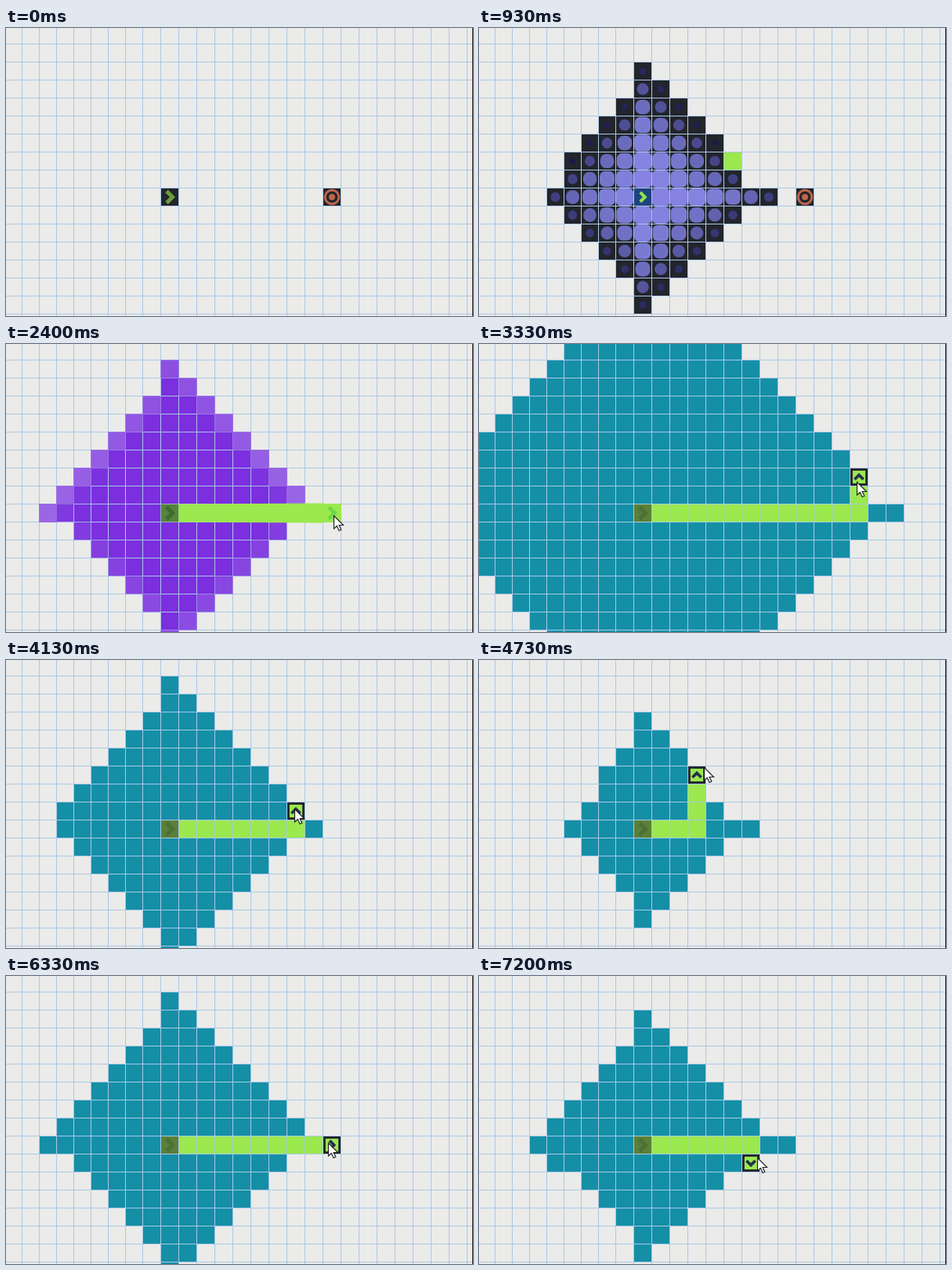
An HTML page with a canvas that plays this animation: 596 by 368 pixels, repeating every 7.27 s.

```html
<!DOCTYPE html>
<html lang="en">
<head>
<meta charset="utf-8">
<title>Pathfinding grid</title>
<style>
html, body { margin: 0; height: 100%; overflow: hidden; background: #ebebe9; }
canvas { display: block; }
</style>
</head>
<body>
<canvas id="stage" width="596" height="368"></canvas>
<script>
const ctx = document.getElementById('stage').getContext('2d');
const LOOP = 7270, DRAG = 2930, PATH = 1400;
const DARK = '#22252b', GREEN = '#9be84f', TEAL = '#158fa6';
const START = { c: 8, r: 8 }, GOAL = { c: 17, r: 8 };
const ARROW = new Path2D('M0 0V16.5L3.8 13L6.6 19L9.3 17.8L6.6 12H12Z');

// Pointer stops: time, column, row (fractions lie inside a cell).
const POINTER = [
  [1330, 21.8, 8.3], [1530, 21.6, 8.1], [1600, 20.9, 8.2], [1730, 19.8, 8.4],
  [1800, 19, 8.5], [1930, 18.1, 8.6], [2000, 17.6, 8.65],
  [2930, 18.2, 8.6], [3000, 19.1, 8.4], [3130, 20.1, 8.2], [3200, 20.4, 7.7],
  [3330, 20.4, 6.8], [3400, 20.3, 6.2], [3530, 20, 5.7], [3600, 19.3, 5.5],
  [3730, 18.6, 5.8], [3800, 18.1, 6.2], [3930, 17.2, 6.7], [4000, 16.4, 7.1],
  [4130, 15.43, 7.4], [4260, 15, 7.3], [4330, 14.5, 7.2],
  [4460, 13.6, 7], [4530, 12.9, 6.6], [4660, 12.5, 5.8], [4730, 11.9, 5.1],
  [4860, 11.3, 4.3], [4930, 10.7, 3.6], [5060, 10.2, 3.1], [5130, 9.9, 2.8],
  [5260, 10.6, 3.6], [5330, 11.65, 4.73], [5460, 12.1, 5.2], [5530, 12.6, 5.7],
  [5660, 13.1, 6.2], [5730, 13.6, 6.6], [5930, 14.2, 7.1], [6000, 14.5, 7.3],
  [6200, 16.1, 8.1], [6330, 17.3, 8.4], [6530, 16.8, 8.5], [6600, 15.8, 8.5],
  [6730, 16.3, 8.5], [6800, 17.2, 8.5], [7000, 16.4, 8.7], [7130, 15.6, 9.1],
  [7200, 14.87, 9.2]
];

const X = c => c >= 7 ? 174 + 23 * (c - 7) : 20 + 22 * c;
const Y = r => 20 + 23 * r;

// Piecewise linear lookup over [position, value] stops; values may be arrays.
function ramp(stops, p) {
  let i = 1;
  while (i < stops.length - 1 && p > stops[i][0]) i++;
  const [a, u] = stops[i - 1], [b, v] = stops[i];
  const k = Math.min(1, Math.max(0, (p - a) / (b - a)));
  return Array.isArray(u) ? u.map((n, j) => n + (v[j] - n) * k) : u + (v - u) * k;
}

// Search order: expanding waves, each swept from the top row down.
function order(c, r) {
  const dx = c - 8, dy = r - 8;
  const wave = Math.abs(dx) + Math.abs(dy) + (dx < 0) - (dy === 0 && dx > 0);
  return wave * 1000 + r * 30 + c;
}

const cells = [];
for (let r = -1; r < 16; r++)
  for (let c = -1; c < 26; c++) cells.push({ c, r, key: order(c, r) });
const CLOCK = [[0, 130], [44, 395], [84, 925], [116, 1226]];
[...cells].sort((a, b) => a.key - b.key).forEach((cell, i) => {
  cell.at = i <= 116 ? ramp(CLOCK, i) : Infinity;
});

const SCALE = [[0, .3], [750, 1], [1125, 1.1], [1500, 1]];
const TINT = [[0, [22, 22, 68]], [750, [132, 132, 224]], [1125, [160, 112, 230]], [1500, [123, 47, 222]]];
const ROUND = [[0, 1], [1000, 0]];
const PATH_SCALE = [[0, .6], [500, 1.14], [1200, 1]];

function box({ c, r }, color, scale = 1, round = 0) {
  const w = X(c + 1) - X(c) - 1, h = 22, sw = w * scale, sh = h * scale;
  ctx.fillStyle = color;
  ctx.beginPath();
  ctx.roundRect(X(c) + 1 + (w - sw) / 2, Y(r) + 1 + (h - sh) / 2, sw, sh, Math.min(.5, round) * sw);
  ctx.fill();
}

function atCenter({ c, r }, draw) {
  ctx.save();
  ctx.translate(X(c) + 12, Y(r) + 12);
  draw();
  ctx.restore();
}

function chevron(cell, color, scale = 1, turn = 0) {
  atCenter(cell, () => {
    ctx.rotate(turn * Math.PI / 2);
    ctx.scale(scale, scale);
    ctx.beginPath();
    ctx.moveTo(-4, -7.5);
    ctx.lineTo(3.5, 0);
    ctx.lineTo(-4, 7.5);
    ctx.lineWidth = 5;
    ctx.strokeStyle = color;
    ctx.stroke();
  });
}

function rings(cell, color, scale) {
  atCenter(cell, () => {
    ctx.scale(scale, scale);
    ctx.strokeStyle = ctx.fillStyle = color;
    ctx.lineWidth = 3;
    ctx.beginPath();
    ctx.arc(0, 0, 8.8, 0, 7);
    ctx.stroke();
    ctx.beginPath();
    ctx.arc(0, 0, 4, 0, 7);
    ctx.fill();
  });
}

function grid() {
  ctx.fillStyle = '#ebebe9';
  ctx.fillRect(0, 0, 596, 368);
  ctx.fillStyle = '#a9c8e8';
  for (let c = 0; c < 26; c++) ctx.fillRect(X(c), 0, 1, 368);
  for (let r = 0; r < 16; r++) ctx.fillRect(0, Y(r), 596, 1);
  ctx.fillStyle = '#222';
  ctx.fillRect(595, 0, 1, 368);
}

function visit(cell, age) {
  if (age < 15) return box(cell, GREEN);
  const scale = ramp(SCALE, age);
  if (age < 1000) box(cell, DARK);
  box(cell, `rgb(${ramp(TINT, age).map(Math.round)})`, scale, ramp(ROUND, age));
}

function search(t) {
  const isEnd = cell => cell.r === 8 && (cell.c === START.c || cell.c === GOAL.c);
  for (const cell of cells)
    if (t >= cell.at && !isEnd(cell)) visit(cell, t - cell.at);

  // Start marker
  box(START, t > 130 && t < PATH ? '#1e4480' : DARK);
  if (t < PATH) {
    chevron(START, t < 130 ? '#6c9c3c' : '#94e24c', t < 130 ? 1 : .8);
  } else {
    const scale = ramp([[0, .3], [600, 1.08], [1200, 1]], t - PATH);
    box(START, '#55843a', scale);
    if (scale > .7) chevron(START, '#3f6b32', scale);
  }

  // Goal marker
  const reached = t - 1226;
  box(GOAL, DARK);
  rings(GOAL, reached < 0 ? '#c0654a' : '#a9a5ac', reached < 0 ? 1 : ramp([[0, .3], [750, .8]], reached));

  for (let i = 1; i <= 9; i++) {
    const age = t - PATH - 60 * i, cell = { c: 8 + i, r: 8 };
    if (age < 0) break;
    const scale = ramp(PATH_SCALE, age);
    if (scale < 1) box(cell, DARK);
    box(cell, GREEN, scale);
    if (i === 9 || age < 60) chevron(cell, i === 9 ? '#70d848' : '#b0ee70', scale * .9);
  }
}

function drag(goal) {
  const limit = order(goal.c, goal.r);
  for (const cell of cells) if (cell.key <= limit) box(cell, TEAL);
  for (let c = 9; c <= goal.c; c++) box({ c, r: 8 }, GREEN);
  const turn = Math.sign(goal.r - 8);
  for (let r = 8 + turn; r !== goal.r; r += turn) box({ c: goal.c, r }, GREEN);
  box(START, '#5a8038');
  chevron(START, '#4c7036');
  box(goal, DARK);
  box(goal, GREEN, .74);
  chevron(goal, '#23304a', .75, turn);
}

function pointer(x, y) {
  ctx.save();
  ctx.translate(x + .5, y + .5);
  ctx.fillStyle = '#fff';
  ctx.strokeStyle = '#222';
  ctx.lineWidth = 1.2;
  ctx.fill(ARROW);
  ctx.stroke(ARROW);
  ctx.restore();
}

function frame(now) {
  const t = now % LOOP, beat = t % 200;
  const tick = t - beat + (beat >= 130 ? 130 : 0);
  const stop = POINTER.filter(p => p[0] <= t).pop();
  grid();
  if (t < DRAG) search(tick);
  else drag({ c: Math.floor(stop[1]), r: Math.floor(stop[2]) });
  if (stop) pointer(Math.round(X(stop[1])), Math.round(Y(stop[2])));
  requestAnimationFrame(frame);
}
requestAnimationFrame(frame);
</script>
</body>
</html>
```
